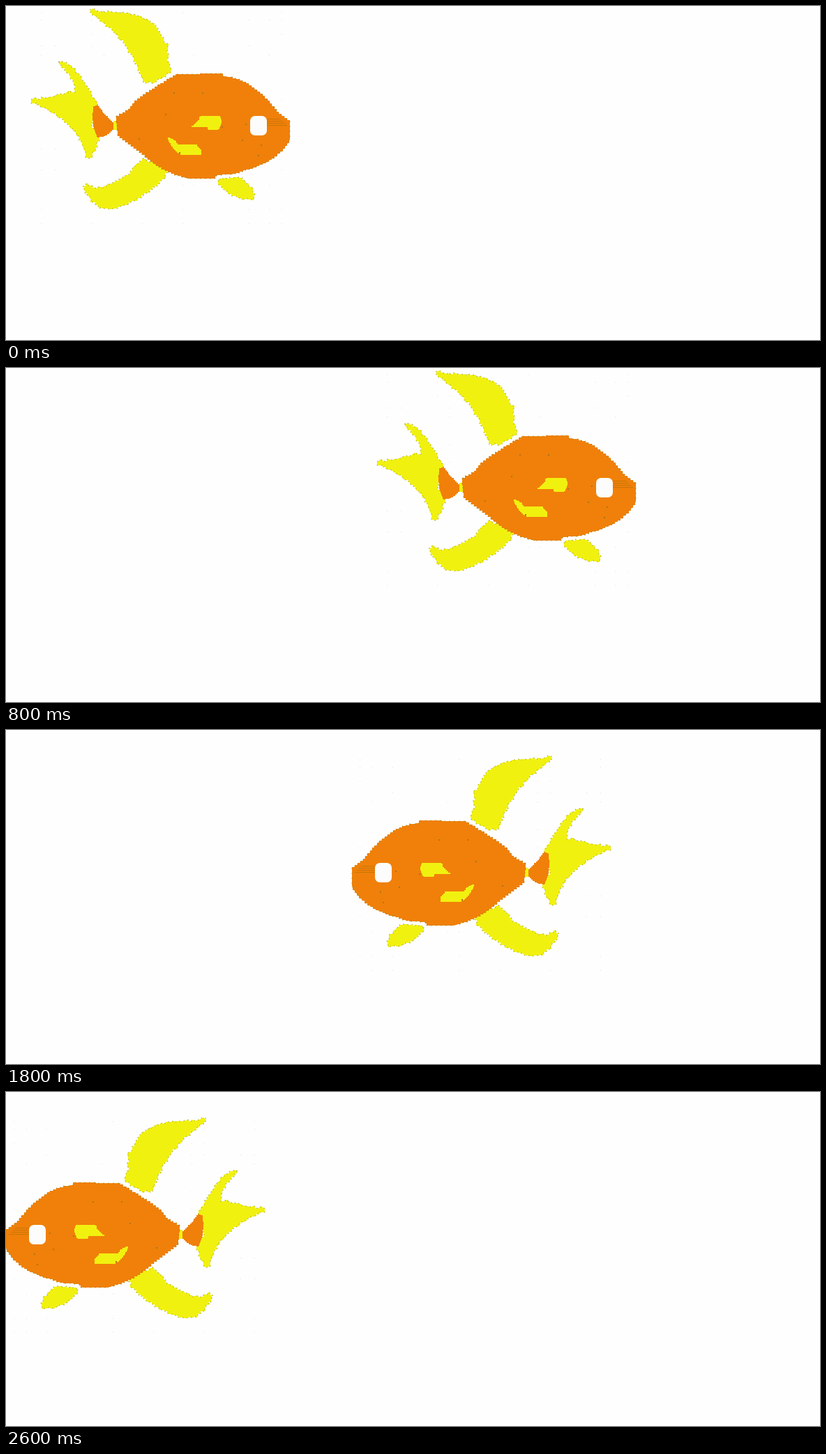
These frames come from a looping animation (1167x480 px, 2700 ms). An HTML page with a canvas:

```html
<!DOCTYPE html>
<html lang="en">
<head>
<meta charset="utf-8">
<title>Swimming goldfish</title>
<style>
  html, body { margin: 0; width: 100%; height: 100%; overflow: hidden; background: #fefefe; }
  canvas { display: block; }
</style>
</head>
<body>
<canvas id="stage" width="1167" height="480"></canvas>
<script>
const ctx = document.getElementById('stage').getContext('2d');
const ORANGE = '#f08009', YELLOW = '#f1f110', OLIVE = '#858510';
const STEP_MS = 100, STEPS = 27, FISH_LEFT = 34, FISH_RIGHT = 407;

// Turning points of the swim: step, left edge, vertical offset, facing left
const route = [
  [0, 34, 0, 0], [1, 68, 33, 0], [4, 266, 132, 0], [8, 530, 0, 0], [12, 794, 132, 0],
  [13, 794, 132, 1], [17, 529, 0, 1], [18, 496, 33, 1], [22, 232, 165, 1],
  [23, 198, 132, 1], [26, 0, 33, 1]
];

let seed = 7;
function random() {
  seed = (seed * 16807) % 2147483647;
  return seed / 2147483647;
}

// Turns a smooth outline into a staircase edge, optionally frayed
function jagged(outline, step, fray = 0) {
  const curve = document.createElementNS('http://www.w3.org/2000/svg', 'path');
  curve.setAttribute('d', outline);
  const length = curve.getTotalLength(), shape = new Path2D();
  let lastY;
  for (let s = 0; s < length; s += step) {
    const p = curve.getPointAtLength(s);
    const x = Math.round(p.x + (random() - 0.5) * fray);
    const y = Math.round(p.y + (random() - 0.5) * fray);
    if (s) shape.lineTo(x, lastY);
    shape.lineTo(x, y);
    lastY = y;
  }
  shape.closePath();
  return shape;
}

const fins = [
  'M121 4L134 8Q165 8 183 13Q213 22 219 38L232 59V80L237 96L222 104L216 110H197C184 72 168 42 124 11Z',
  'M76 79Q96 84 107 103L131 141L124 150V175L134 190L124 219H114Q108 165 35 138V134Q65 130 98 122Q103 108 78 85Z',
  'M196 220L206 224L214 221L230 233V244Q200 277 160 291H140Q123 285 110 260L115 255Q130 270 167 246Q180 238 188 226Z',
  'M304 249L328 245Q342 247 357 272L356 279Q315 277 304 249Z'
].map(d => jagged(d, 3, 3));

const body = jagged('M158 158L175 148L183 137Q210 116 243 98L308 97L310 101Q350 103 388 152' +
  'L407 167V195Q390 225 345 236L328 242L302 243V248H265Q227 240 200 215L160 185Z', 5);
const tailRoot = jagged('M125 144L131 142Q140 157 154 168V178Q147 188 132 189Q122 173 125 144Z', 3);
const marks = [
  'M264 174L277 163V158H307L309 168L306 178H290L289 174Z',
  'M232 189L243 194L245 199H272L280 208V214H253Q239 208 232 189Z'
].map(d => jagged(d, 3));

const flecks = [];
for (const x of [50, 70, 122, 140, 195, 253, 269, 348, 377, 395]) {
  for (const y of [9, 20, 40, 57, 70, 110, 135, 205, 235, 257, 292, 312]) {
    if (random() < 0.45) flecks.push([x, y]);
  }
}
const specks = [[190, 190], [248, 210], [338, 192], [343, 169], [361, 214], [365, 199],
  [309, 173], [281, 124], [240, 124], [228, 155]];

function fill(shape, color) {
  ctx.fillStyle = color;
  ctx.fill(shape);
}

function drawFish() {
  ctx.fillStyle = '#e2e2d8';
  for (const [x, y] of flecks) ctx.fillRect(x, y, 1, 1);

  ctx.strokeStyle = OLIVE;
  ctx.lineWidth = 0.6;
  ctx.setLineDash([2, 5]);
  for (const fin of fins) {
    fill(fin, YELLOW);
    ctx.stroke(fin);
  }
  ctx.fillRect(154, 165, 5, 13);
  fill(tailRoot, ORANGE);
  fill(body, ORANGE);
  ctx.stroke(body);
  for (const mark of marks) fill(mark, YELLOW);

  ctx.fillStyle = '#a87620';
  for (const [x, y] of specks) ctx.fillRect(x, y, 2, 2);
  ctx.fillStyle = '#c87508';
  for (let y = 162; y < 173; y += 3) ctx.fillRect(374, y, 20 + (y - 162), 1);

  ctx.fillStyle = '#fcfcfc';
  ctx.beginPath();
  ctx.roundRect(350, 158, 24, 28, 7);
  ctx.fill();
}

function poseAt(step) {
  const next = Math.max(1, route.findIndex(key => key[0] >= step));
  const a = route[next - 1], b = route[next];
  const k = (step - a[0]) / (b[0] - a[0]);
  const mix = i => Math.round(a[i] + (b[i] - a[i]) * k);
  return { left: mix(1), drop: mix(2), flipped: mix(3) };
}

function render(now) {
  const { left, drop, flipped } = poseAt(Math.floor(now / STEP_MS) % STEPS);
  ctx.setTransform(1, 0, 0, 1, 0, 0);
  ctx.fillStyle = '#fefefe';
  ctx.fillRect(0, 0, 1167, 480);
  if (flipped) ctx.setTransform(-1, 0, 0, 1, left + FISH_RIGHT, drop);
  else ctx.setTransform(1, 0, 0, 1, left - FISH_LEFT, drop);
  drawFish();
}

const start = performance.now();
function tick() {
  render(performance.now() - start);
  requestAnimationFrame(tick);
}
tick();
</script>
</body>
</html>
```
